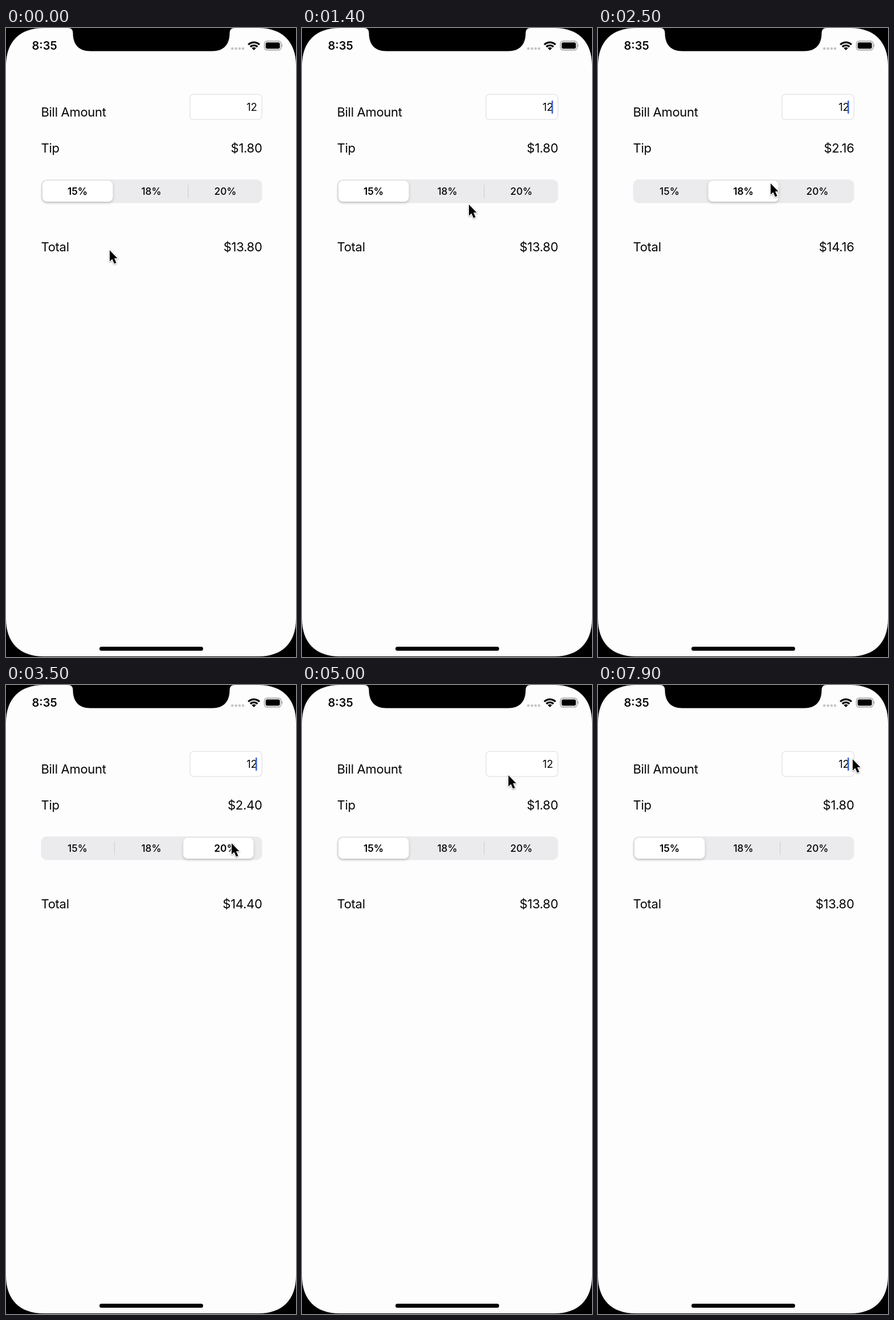
These frames come from a looping animation (509x1101 px, 8 s). An HTML page:

```html
<!DOCTYPE html>
<html lang="en">
<head>
<meta charset="utf-8">
<title>Tip calculator</title>
<style>
  html, body { margin: 0; width: 100%; height: 100%; overflow: hidden; background: #000; }
  svg { display: block; width: 509px; height: 1101px; }
  text { font-family: Inter, "Liberation Sans", sans-serif; fill: #050505; }

  .label { font-size: 22px; letter-spacing: -.3px; }
  .end { text-anchor: end; }
  .input { font-size: 18.5px; letter-spacing: -.3px; }
  .clock { font-size: 20px; font-weight: 600; }
  .seg { font-size: 17.3px; font-weight: 500; text-anchor: middle; }
  .sep { fill: #d3d2d6; }

  /* Selected rate: 15% until 1.6 s, 18% until 3.2 s, 20% until 4.35 s, then 15% */
  .on15, .on18, .on20, .bold15, .bold18, .bold20 { animation: 8s step-end infinite; }
  .on15 { animation-name: on15; }
  .on18 { animation-name: on18; }
  .on20 { animation-name: on20; }
  .bold15 { animation-name: bold15; }
  .bold18 { animation-name: bold18; }
  .bold20 { animation-name: bold20; }
  @keyframes on15 { 0%, 54.375%, 100% { visibility: visible } 20% { visibility: hidden } }
  @keyframes on18 { 0%, 40%, 100% { visibility: hidden } 20% { visibility: visible } }
  @keyframes on20 { 0%, 54.375%, 100% { visibility: hidden } 40% { visibility: visible } }
  @keyframes bold15 { 0%, 54.375%, 100% { font-weight: 600 } 20% { font-weight: 500 } }
  @keyframes bold18 { 0%, 40%, 100% { font-weight: 500 } 20% { font-weight: 600 } }
  @keyframes bold20 { 0%, 54.375%, 100% { font-weight: 500 } 40% { font-weight: 600 } }

  .pill {
    fill: #fff;
    filter: drop-shadow(0 2px 2.5px rgba(0, 0, 0, .2));
    animation: slide 8s ease-out infinite;
  }
  @keyframes slide {
    0%, 20% { transform: none }
    25%, 40% { transform: translateX(129.5px) }
    45%, 54.375% { transform: translateX(259px) }
    59.375%, 100% { transform: none }
  }

  .caret, .drag { fill: #4166d6; }
  .caret { animation: blink 1s linear infinite; }
  @keyframes blink {
    0%, 18% { opacity: 0 }
    38%, 80% { opacity: 1 }
    100% { opacity: 0 }
  }
  .idle { animation: idle 8s step-end infinite; }
  @keyframes idle { 0% { visibility: visible } 72.5%, 100% { visibility: hidden } }

  /* The caret grows while it is dragged and settles when dropped */
  .drag { animation: drag 8s ease-in-out infinite, held 8s step-end infinite; }
  @keyframes held { 0% { visibility: hidden } 72.5%, 100% { visibility: visible } }
  @keyframes drag {
    0%, 72.5% { x: 438px; y: 127px; width: 2.6px; height: 23px }
    75% { x: 436px; y: 119px; width: 4px; height: 28px }
    81.25%, 86.25% { x: 411px; y: 118.5px; width: 4px; height: 28px }
    95% { x: 437px; y: 120px; width: 4px; height: 28px }
    97.5%, 100% { x: 438px; y: 127px; width: 2.6px; height: 23px }
  }

  .cursor {
    stroke: #fff;
    stroke-width: 2.6px;
    stroke-linejoin: round;
    paint-order: stroke;
    filter: drop-shadow(0 1.5px 1.2px rgba(0, 0, 0, .35));
    animation: move 8s ease-in-out infinite;
  }
  @keyframes move {
    0%, 2.5% { transform: translate(182px, 389px) }
    17.5% { transform: translate(293px, 309px) }
    21% { transform: translate(302px, 275px) }
    23.75%, 31.25% { transform: translate(303px, 272px) }
    35% { transform: translate(400px, 277px) }
    37.5%, 45% { transform: translate(396px, 277px) }
    50% { transform: translate(131px, 278px) }
    53.75% { transform: translate(137px, 276px) }
    61.25% { transform: translate(137px, 276px) }
    62.5% { transform: translate(362px, 158px); animation-timing-function: ease-out }
    68.75%, 72.5% { transform: translate(440px, 142px) }
    81.25%, 86.25% { transform: translate(412px, 142px) }
    96.25%, 100% { transform: translate(447px, 130px) }
  }
</style>
</head>
<body>
<svg viewBox="0 0 509 1101">
  <!-- Screen and notch -->
  <path fill="#fefdfe" d="M0 66C0 24 24 0 66 0H443C485 0 509 24 509 66V1034C509 1076 485 1100 443 1100H66C24 1100 0 1076 0 1034Z"/>
  <path d="M109 0Q117.500 0 117.500 9C117.500 29 128 40.500 148 40.500H362C382 40.500 392.500 29 392.500 9Q392.500 0 401 0Z"/>
  <rect x="164" y="1083" width="182" height="7" rx="3.500"/>

  <!-- Status bar -->
  <text class="clock" x="45.500" y="38.300">8:35</text>
  <g fill="#c5c4c7">
    <circle cx="397.200" cy="36" r="2.300"/>
    <circle cx="403.600" cy="36" r="2.300"/>
    <circle cx="409.900" cy="36" r="2.300"/>
    <circle cx="416" cy="36" r="2.300"/>
  </g>
  <g fill="none" stroke="#000" stroke-width="3.300">
    <path d="M425.300 29.200A13.800 13.800 0 0 1 444.900 29.200"/>
    <path d="M428.900 33A8.700 8.700 0 0 1 441.300 33"/>
  </g>
  <path d="M435.100 39L431.500 35.300A5.200 5.200 0 0 1 438.700 35.300Z"/>
  <rect x="453.500" y="23" width="29.500" height="15.500" rx="4.500" fill="none" stroke="#999" stroke-width="1.300"/>
  <rect x="455.700" y="25.200" width="25" height="11.100" rx="2.700"/>
  <path fill="#999" d="M484.300 28.300Q487 30.800 484.300 33.300Z"/>

  <!-- Bill -->
  <text class="label" x="61.500" y="155">Bill Amount</text>
  <rect x="322.700" y="116.200" width="126.600" height="44" rx="6.500" fill="#fff" stroke="#e1e1e5" stroke-width="1.300"/>
  <text class="input end" x="440.500" y="145.200">12</text>
  <g class="idle"><rect class="caret" x="438" y="127" width="2.600" height="23" rx="1"/></g>
  <rect class="drag" x="438" y="127" width="2.600" height="23" rx="1"/>

  <!-- Tip -->
  <text class="label" x="61.500" y="217.800">Tip</text>
  <g class="label end">
    <text class="on15" x="449.500" y="217.800">$1.80</text>
    <text class="on18" x="449.500" y="217.800">$2.16</text>
    <text class="on20" x="449.500" y="217.800">$2.40</text>
  </g>

  <!-- Rate control -->
  <rect x="61.500" y="265" width="388" height="41.500" rx="10" fill="#ebeaec"/>
  <rect class="sep on20" x="189.800" y="274.500" width="1.300" height="23"/>
  <rect class="sep on15" x="319" y="274.500" width="1.300" height="23"/>
  <rect class="pill" x="64" y="267.300" width="123.500" height="36.700" rx="8"/>
  <text class="seg bold15" x="125.500" y="292.300">15%</text>
  <text class="seg bold18" x="255" y="292.300">18%</text>
  <text class="seg bold20" x="385" y="292.300">20%</text>

  <!-- Total -->
  <text class="label" x="61.500" y="391.300">Total</text>
  <g class="label end">
    <text class="on15" x="449.500" y="391.300">$13.80</text>
    <text class="on18" x="449.500" y="391.300">$14.16</text>
    <text class="on20" x="449.500" y="391.300">$14.40</text>
  </g>

  <path class="cursor" d="M0 0V19.500L4.500 15.500L8 23.500L11.500 22L8 14H13.500Z"/>
</svg>
</body>
</html>
```
